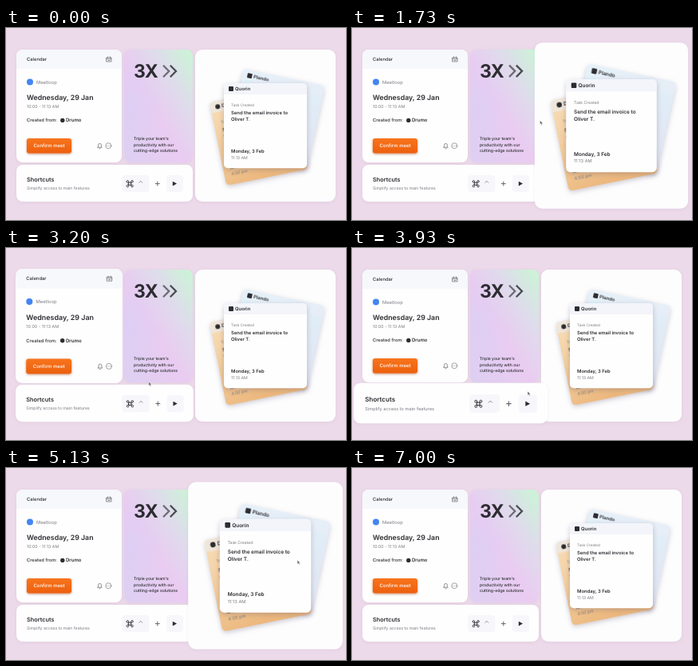
These frames come from a looping animation (426 by 240 pixels, 7070 ms). An HTML page:

```html
<!DOCTYPE html>
<html lang="en">
<head>
<meta charset="utf-8">
<title>Bento dashboard</title>
<style>
  html, body { margin: 0; height: 100%; overflow: hidden; background: #ecd9e9; }
  svg { display: block; width: 100vw; height: 100vh; font-family: Inter, Arial, sans-serif; fill: #2c2c31; text-rendering: geometricPrecision; }
  .card { filter: drop-shadow(0 1px 2px #8a78a018); }
  .note { filter: drop-shadow(0 2px 3px #50466048); }
  .line { fill: none; stroke: #66666d; stroke-width: .7; stroke-linecap: round; stroke-linejoin: round; }
  .soft { fill: #7c7c84; }
  .bold { font-weight: 600; }
  .mid { font-weight: 500; }
</style>
</head>
<body>
<svg viewBox="0 0 426 240" preserveAspectRatio="none">
  <defs>
    <linearGradient id="speed" x1="0" y1="1" x2="1" y2="0">
      <stop stop-color="#ddd0f2"/><stop offset=".45" stop-color="#eacbf1"/>
      <stop offset=".7" stop-color="#dfdbec"/><stop offset="1" stop-color="#c9f6d4"/>
    </linearGradient>
    <radialGradient id="haze" cx=".1" cy=".5" r=".5">
      <stop stop-color="#d6d0f5" stop-opacity=".5"/><stop offset="1" stop-color="#d6d0f5" stop-opacity="0"/>
    </radialGradient>
    <linearGradient id="blue" x2=".6" y2="1">
      <stop stop-color="#e0f4fb"/><stop offset="1" stop-color="#e1e6f3"/>
    </linearGradient>
    <linearGradient id="amber" x2=".4" y2="1">
      <stop stop-color="#f8dfba"/><stop offset="1" stop-color="#ecb87e"/>
    </linearGradient>
    <linearGradient id="button" x2="0" y2="1">
      <stop stop-color="#f8741c"/><stop offset="1" stop-color="#ec600e"/>
    </linearGradient>
  </defs>
  <rect width="426" height="240" fill="#ecd9e9"/>

  <g id="speedup" class="card">
    <rect x="148" y="27" width="86" height="141" rx="8" fill="url(#speed)"/>
    <rect x="148" y="27" width="86" height="141" rx="8" fill="url(#haze)"/>
    <text x="160" y="62.2" font-size="23" font-weight="700" letter-spacing="-.5">3X</text>
    <g fill="none" stroke-width="2.3">
      <path d="M197 46.8l7.2 7.2-7.2 7.2" stroke="#6f6a76"/><path d="M205.8 46.8l7.2 7.2-7.2 7.2" stroke="#4c4a52"/>
    </g>
    <g class="mid" font-size="5.1">
      <text x="160" y="140.2">Triple your team's</text>
      <text x="160" y="147.6">productivity with our</text>
      <text x="160" y="155">cutting-edge solutions</text>
    </g>
  </g>

  <g id="calendar" class="card">
    <rect x="13" y="27" width="132" height="141" rx="8" fill="#fefefe"/>
    <path d="M13 51V35a8 8 0 0 1 8-8h116a8 8 0 0 1 8 8v16z" fill="#f6f8fb"/>
    <text x="26" y="41" font-size="5.8" class="mid">Calendar</text>
    <path class="line" d="M126 37h6v5h-6zM126 38.8h6M127.5 36v1.5M130.5 36v1.5M128 40.5h2"/>
    <circle cx="30" cy="67.5" r="4" fill="#4285f4"/>
    <text x="38" y="69.6" font-size="5.8" class="soft">Meetloop</text>
    <text x="26" y="90.2" font-size="8.8" class="bold">Wednesday, 29 Jan</text>
    <text x="26" y="100" font-size="5.3" class="soft">10:00 - 11:13 AM</text>
    <text x="26" y="117.4" font-size="5.75" class="mid">Created from:</text>
    <circle cx="70.8" cy="115.4" r="2.7"/>
    <text x="75" y="117.4" font-size="6" class="bold">Drumo</text>
    <rect x="26" y="138" width="56" height="18.5" rx="3" fill="url(#button)" style="filter:drop-shadow(0 1.5px 1.5px #a8481099)"/>
    <text x="54" y="149.4" font-size="6" class="mid" fill="#fff" text-anchor="middle">Confirm meet</text>
    <path class="line" d="M114.8 149.3h5.4l-.8-1.2v-1.8a1.9 1.9 0 0 0-3.8 0v1.8zM117 150.8h1"/>
    <circle class="line" cx="128.3" cy="147.2" r="3.5" style="stroke-width:.6"/>
    <path class="line" d="M126.6 147.2h0M128.3 147.2h0M130 147.2h0"/>
  </g>

  <g id="shortcuts" class="card">
    <rect x="13" y="171" width="221" height="46" rx="8" fill="#fefefe"/>
    <text x="26" y="192.4" font-size="7.3" class="bold">Shortcuts</text>
    <text x="26" y="202" font-size="5.15" class="soft">Simplify access to main features</text>
    <rect x="145" y="184" width="34.5" height="21" rx="4" fill="#f7f7fb"/>
    <rect x="201" y="184" width="21" height="21" rx="4" fill="#f7f7fb"/>
    <path class="line" style="stroke:#2c2c31;stroke-width:.9" d="M153.7 193.2h3v3h-3zM153.7 193.2h-1.2a1.3 1.3 0 1 1 1.2-1.3zM156.7 193.2v-1.3a1.3 1.3 0 1 1 1.2 1.3zM156.7 196.2h1.2a1.3 1.3 0 1 1-1.2 1.3zM153.7 196.2v1.3a1.3 1.3 0 1 1-1.2-1.3z"/>
    <path class="line" d="M166.8 193.3l2-2 2 2"/>
    <path class="line" style="stroke-width:1" d="M187.3 194.6h5M189.8 192.1v5"/>
    <path d="M208.8 191.7v5.8l5.2-2.9z"/>
  </g>

  <g id="tasks" class="card">
    <rect x="237" y="27" width="176" height="190" rx="9" fill="#fdfdfe"/>
    <g id="notes"></g>
  </g>

  <path id="cursor" d="M0 0v5.2l1.3-1.1.9 1.8.9-.4-.8-1.8h1.6z" fill="#66666b" stroke="#fff" stroke-width=".5"/>
</svg>
<script>
const LOOP = 7070, GROW = 0.1, FADE = 300;
const $ = id => document.getElementById(id);
const svg = document.querySelector('svg'), cursor = $('cursor');

const note = (x, y, turn, fill, name, time, mark) => `
  <g class="note" transform="translate(${x} ${y}) rotate(${turn})">
    <rect width="104" height="106.3" rx="5" fill="${fill}"/>
    <path d="M0 14V5a5 5 0 0 1 5-5h94a5 5 0 0 1 5 5v9z" fill="#eceef8" opacity=".55"/>
    ${mark}
    <text x="14" y="9.3" font-size="5.9" class="bold">${name}</text>
    <text x="9" y="28.6" font-size="4.6" class="soft">Task Created</text>
    <g class="bold" font-size="5.9">
      <text x="9" y="39">Send the email invoice to</text>
      <text x="9" y="47.2">Oliver T.</text>
      <text x="9" y="87.4">Monday, 3 Feb</text>
    </g>
    <text x="9" y="95.3" font-size="5.2" class="soft">${time}</text>
  </g>`;
const square = '<rect x="6" y="4" width="6" height="6" rx="1"/>';
const dot = '<circle cx="9" cy="7.2" r="3"/>';
$('notes').innerHTML =
  note(298, 51, 12, 'url(#blue)', 'Plando', '2:30 pm', square) +
  note(255, 93, -11.5, 'url(#amber)', 'Drumo', '4:00 pm', dot) +
  note(273, 69, 0, '#fefefe', 'Quorin', '11:13 AM', square);

// Centre of each card and the spans during which it is hovered
const cards = [
  { el: $('speedup'), x: 191, y: 97.5, spans: [[1700, 1900]] },
  { el: $('calendar'), x: 79, y: 97.5, spans: [[1900, 2970]] },
  { el: $('shortcuts'), x: 123.5, y: 194, spans: [[3150, 4450]] },
  { el: $('tasks'), x: 325, y: 122, spans: [[450, 1680], [4480, 5400]] }
];
// Cursor moves: start, end, target x, target y
const moves = [
  [250, 850, 351, 99], [1350, 2200, 77.5, 138], [2750, 3450, 220, 179],
  [4250, 4950, 365, 115], [5250, 5600, 440, 90]
];

const ease = p => (p = Math.min(1, Math.max(0, p)), p * p * (3 - 2 * p));

function draw(t) {
  for (const card of cards)
    card.grow = Math.max(...card.spans.map(([a, b]) => ease((t - a) / FADE) - ease((t - b) / FADE)));
  for (const { el, x, y, grow } of [...cards].sort((a, b) => a.grow - b.grow)) {
    el.setAttribute('transform', `translate(${x} ${y}) scale(${1 + GROW * grow}) translate(${-x} ${-y})`);
    svg.insertBefore(el, cursor);
  }
  let x = 440, y = 75;
  for (const [a, b, tx, ty] of moves) {
    const p = ease((t - a) / (b - a));
    x += (tx - x) * p;
    y += (ty - y) * p;
  }
  cursor.setAttribute('transform', `translate(${x} ${y})`);
}

const start = performance.now();
(function tick() {
  draw((performance.now() - start) % LOOP);
  requestAnimationFrame(tick);
})();
</script>
</body>
</html>
```
